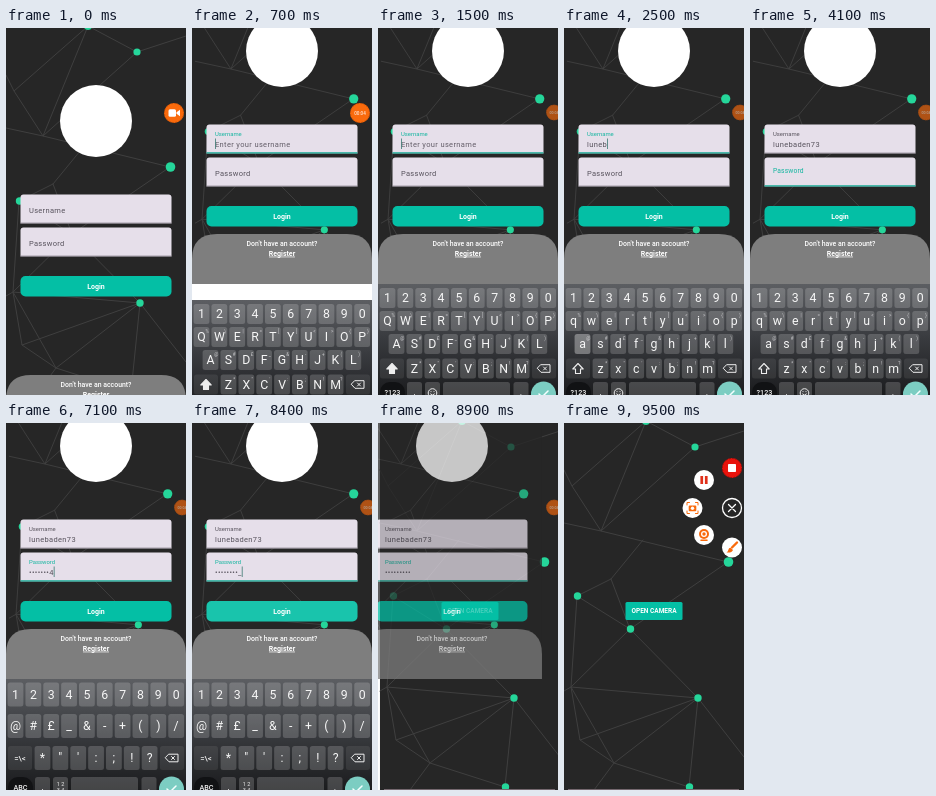
These frames come from a looping animation (180 by 367 pixels, 9900 ms). An HTML page:

```html
<!DOCTYPE html>
<html lang="en">
<head>
<meta charset="utf-8">
<title>Login screen</title>
<style>
html, body { margin: 0; width: 100%; height: 100%; overflow: hidden; background: #262626; }
svg { display: block; width: 100%; height: 100%; }
text { font-family: Roboto, "Noto Sans", sans-serif; white-space: pre; }
.mid { text-anchor: middle; }
</style>
</head>
<body>
<svg id="stage" viewBox="0 0 180 367">
  <defs>
    <clipPath id="pageClip"><rect id="pageBox" width="180" height="397"/></clipPath>
    <clipPath id="btnClip"><rect x="14.500" y="178" width="151" height="20.500" rx="5"/></clipPath>
    <linearGradient id="boardFill" gradientUnits="userSpaceOnUse" x1="0" y1="256" x2="0" y2="367">
      <stop stop-color="#5c5e62"/><stop offset=".5" stop-color="#383a3e"/><stop offset="1" stop-color="#1b1c1e"/>
    </linearGradient>
  </defs>
  <rect width="180" height="367" fill="#fff"/>
</svg>
<script>
const LOOP = 9900, STEP = 100;
const TEAL = '#04bfa5', INK = '#57525c', ORANGE = '#f96a0c';
const USER = 'lunebaden73', PASS = 'treewet4_';
const userTimes = [1700, 1900, 2000, 2200, 2400, 2600, 2700, 2900, 3000, 3200, 3350];
const passTimes = [5100, 5500, 5700, 5800, 6200, 6400, 6550, 6700, 7650];

const stage = document.getElementById('stage');
const pageBox = document.getElementById('pageBox');

function add(parent, tag, attrs = {}, content = '') {
  const el = document.createElementNS('http://www.w3.org/2000/svg', tag);
  set(el, attrs);
  if (content) el.textContent = content;
  parent.appendChild(el);
  return el;
}
function set(el, attrs) {
  for (const k in attrs) el.setAttribute(k, attrs[k]);
}
const group = (parent, attrs) => add(parent, 'g', attrs);
const box = (p, x, y, width, height, fill, rx = 0) => add(p, 'rect', { x, y, width, height, fill, rx });
const dot = (p, cx, cy, r, fill) => add(p, 'circle', { cx, cy, r, fill });
const line = (p, d, stroke, w = 1, fill = 'none') =>
  add(p, 'path', { d, stroke, fill, 'stroke-width': w, 'stroke-linecap': 'round', 'stroke-linejoin': 'round' });
const label = (p, x, y, size, fill, str, more = {}) =>
  add(p, 'text', { x, y, fill, 'font-size': size, ...more }, str);
const centred = (p, x, y, size, fill, str, weight = 400) =>
  label(p, x, y, size, fill, str, { class: 'mid', 'font-weight': weight });
const show = (el, on) => set(el, { visibility: on ? 'inherit' : 'hidden' });
const move = (el, x, y, s = 1) => set(el, { transform: `translate(${x} ${y}) scale(${s})` });

// Value at t from a list of [time, value], linear in between
function track(t, keys) {
  if (t <= keys[0][0]) return keys[0][1];
  for (let i = 1; i < keys.length; i++) {
    const [a, u] = keys[i - 1], [b, v] = keys[i];
    if (t <= b) return u + (v - u) * (t - a) / (b - a);
  }
  return keys[keys.length - 1][1];
}

function network(parent) {
  const g = group(parent);
  line(g, 'M82 -2L131 24L37 108L82 -2L8 63L37 108L164 139L66 206L134 275L50 340L7 264L66 206' +
    'L13 173L47 156L79 117M47 156L66 206M0 47L8 63M0 100L37 108M13 173L7 264L16 317L134 275' +
    'L125 364L50 340L30 367M134 275L180 334M0 268L7 264L134 275M16 317L50 340M131 24L180 8', '#3f3f3f', 1);
  [[82, -2, 4], [131, 24, 3.6], [164.500, 139, 4.8], [13.500, 173, 3.7], [66.500, 206, 3.7],
    [134, 275, 3.7], [125.500, 364, 3.7]].forEach(n => dot(g, ...n, '#25d69a'));
  return g;
}

// Camera page
const cam = group(stage);
box(cam, 0, 0, 180, 367, '#262626');
network(cam);
box(cam, 61.500, 179, 57, 18, TEAL, 1.500);
centred(cam, 90, 190.400, 6.500, '#fff', 'OPEN CAMERA', 700);
box(cam, 4, 366, 171, 1, '#75686f');

// Login page
const login = group(stage);
const page = group(login, { 'clip-path': 'url(#pageClip)' });
box(page, 0, 0, 180, 397, '#262626');
const net = network(page);
const form = group(page);
dot(form, 90, 23, 36, '#fff');

function field(y, name, hint) {
  const g = group(form, { transform: `translate(14.500 ${y})` });
  add(g, 'path', { d: 'M0 29V3Q0 0 3 0H148Q151 0 151 3V29Z', fill: '#e6dfea' });
  const rule = box(g, 0, 28.200, 151, .8, '#77717b');
  const title = label(g, 8.500, 18.600, 7.500, INK, name);
  const typed = label(g, 8.500, 22.300, 7.500, INK, '', { 'letter-spacing': .35 });
  const caret = box(g, 8.500, 14, .8, 10.500, '#3c7a73');
  return (focus, lift, str, caretOn) => {
    set(rule, focus ? { y: 27.800, height: 1.200, fill: '#08a891' } : { y: 28.200, height: .8, fill: '#77717b' });
    set(title, {
      y: 18.600 - 7.200 * lift, 'font-size': 7.500 - 1.600 * lift,
      'letter-spacing': .3 * (1 - lift), fill: focus ? '#12b59f' : INK
    });
    const empty = !str;
    typed.textContent = empty && focus && lift === 1 ? hint : str;
    set(typed, { fill: empty ? '#635d68' : INK });
    show(caret, caretOn);
    set(caret, { x: empty ? 8.500 : 8.500 + typed.getComputedTextLength() });
  };
}
const userField = field(96.500, 'Username', 'Enter your username');
const passField = field(129.500, 'Password', 'Enter your password');

box(form, 14.500, 178, 151, 20.500, TEAL, 5);
const ripple = add(group(form, { 'clip-path': 'url(#btnClip)' }), 'circle', { cx: 90, cy: 188, fill: '#fff' });
centred(form, 90, 190.700, 7, '#fff', 'Login', 700);

const card = group(page);
add(card, 'path', { d: 'M0 256V231Q0 206 25 206H155Q180 206 180 231V256Z', fill: '#7e7e7e' });
centred(card, 90, 217.600, 6.900, '#fff', "Don't have an account?", 500);
centred(card, 90, 227.600, 7, '#fff', 'Register', 700);
box(card, 77, 228.600, 26, .7, '#fff');

// Keyboard
const board = group(stage);
box(board, 0, 256, 180, 111, 'url(#boardFill)');
box(board, 0, 366, 180, 80, '#1b1c1e');
const KEY = 'rgba(255,255,255,.18)', DARK = 'rgba(255,255,255,.08)';

function keyRow(g, map, chars, x0, y, h, hints = '') {
  [...chars].forEach((c, i) => {
    const x = x0 + 17.850 * i;
    box(g, x - 7.900, y - h / 2, 15.800, h, KEY, 2.500);
    centred(g, x, y + 4.200, 12.300, '#f6f6f6', c);
    if (hints) centred(g, x + 5.800, y - 4, 4.600, '#c9c9cc', hints[i]);
    map[c] = [x, y, h];
  });
}
function eraseKey(g, y, h) {
  box(g, 154, y - h / 2, 24, h, DARK, 2.500);
  line(g, `M163 ${y - 3.800}H172V${y + 3.800}H163L159.500 ${y}ZM165.500 ${y - 1.500}l3 3m0 -3l-3 3`, '#eee', 1);
}
function bottomRow(g, y, name, digits) {
  box(g, 2, y - 10, 25, 22, '#111214', 10);
  centred(g, 14.500, y + 2.800, 7.200, '#f4f4f4', name, 500);
  [[29, 15], [47, 15], [65, 67], [135.500, 15]].forEach(([x, w]) => box(g, x, y - 10, w, 22, KEY, 2.500));
  centred(g, 36.500, y + 3, 9, '#eee', ',');
  centred(g, 143, y + 3, 9, '#eee', '.');
  if (digits) {
    centred(g, 54.500, y - 1, 5.500, '#eee', '1 2');
    centred(g, 54.500, y + 5, 5.500, '#eee', '3 4');
  } else {
    add(g, 'circle', { cx: 54.500, cy: y + 1, r: 4.300, fill: 'none', stroke: '#eee' });
    line(g, `M52.500 ${y + 2}q2 2.500 4 0M53 ${y - .5}v.2M56 ${y - .5}v.2`, '#eee', .9);
  }
  dot(g, 165.500, y + 2, 12.500, '#7ccdc2');
  line(g, `M161 ${y + 2}l3 3l6 -6`, '#f5ffff', 1.500);
}
function letters(upper) {
  const g = group(board), map = {}, cs = s => upper ? s.toUpperCase() : s;
  keyRow(g, map, '1234567890', 9.500, 270, 20);
  keyRow(g, map, cs('qwertyuiop'), 9.500, 293, 20, '%\\|=[]<>{}');
  keyRow(g, map, cs('asdfghjkl'), 18.500, 316, 20, '@#£_&-+()');
  keyRow(g, map, cs('zxcvbnm'), 36.500, 340.500, 20, '*"\':;!?');
  box(g, 2, 330.500, 24, 20, DARK, 2.500);
  line(g, 'M14 335.500L8.800 341H11.500V345.500H16.500V341H19.200Z', '#eee', 1.100, upper ? '#eee' : 'none');
  eraseKey(g, 340.500, 20);
  bottomRow(g, 364, '?123', false);
  return { g, map };
}
function symbols() {
  const g = group(board), map = {};
  keyRow(g, map, '1234567890', 9.500, 271.500, 24);
  keyRow(g, map, '@#£_&-+()/', 9.500, 303, 24);
  keyRow(g, map, '*"\':;!?', 36.500, 335, 24);
  box(g, 2, 323, 24, 24, DARK, 2.500);
  centred(g, 14, 337.500, 7.800, '#f4f4f4', '=\\<', 500);
  eraseKey(g, 335, 24);
  bottomRow(g, 364, 'ABC', true);
  return { g, map };
}
const caps = letters(true), lower = letters(false), signs = symbols();
const glow = box(board, 0, 0, 15.800, 20, 'rgba(255,255,255,.2)', 2.500);

// Floating recorder button and its menu
const bubble = group(stage);
dot(bubble, 0, 0, 10, ORANGE);
add(bubble, 'circle', { r: 9.500, fill: 'none', stroke: '#b94a05', 'stroke-dasharray': '1.500 1.500', 'stroke-width': .8 });
const video = group(bubble);
box(video, -5.500, -3.800, 7.500, 7.600, '#fff', 1.500);
add(video, 'path', { d: 'M2.500 -.7L6 -3.300V3.300L2.500 .7Z', fill: '#fff' });
const timer = centred(bubble, 0, 1.700, 4.600, '#ffe3d0', '00:04', 500);

const menu = group(stage);
const items = [[0, -40], [-28, -28], [-39.500, 0], [-28, 27], [0, 39.500]].map(([x, y], i) => {
  const g = group(menu);
  dot(g, 0, 0, 10, i ? '#fff' : '#e8130c');
  return { g, x, y };
});
const [rec, pause, shot, webcam, brush] = items.map(i => i.g);
add(rec, 'circle', { r: 9.600, fill: 'none', stroke: '#7d100c', 'stroke-dasharray': '1.500 1.500', 'stroke-width': .8 });
box(rec, -4, -4, 8, 8, '#fff', .8);
box(pause, -3.600, -4, 2.700, 8, '#e0301a');
box(pause, .9, -4, 2.700, 8, '#e0301a');
line(shot, 'M-5.500 -3V-5.500H-3M3 -5.500H5.500V-3M5.500 3V5.500H3M-3 5.500H-5.500V3', ORANGE, 1);
box(shot, -3.800, -2.600, 7.600, 5.800, ORANGE, 1);
dot(shot, 0, .3, 1.700, '#fff');
dot(webcam, 0, -1, 5, ORANGE);
dot(webcam, 0, -1, 3, '#fff');
dot(webcam, 0, -1, 1.700, ORANGE);
line(webcam, 'M-3 5.300H3', ORANGE, 1.500);
line(brush, 'M5 -5L0 0', ORANGE, 2.400);
add(brush, 'path', { d: 'M-1.500 .2L1 2.500Q0 5.500 -5.500 5Q-3.700 4 -3.600 2.200Q-3.300 .4 -1.500 .2Z', fill: ORANGE });
const close = group(menu, { transform: 'translate(168 85)' });
add(close, 'circle', { r: 9.500, fill: '#262626', stroke: '#fff', 'stroke-width': 1.300 });
line(close, 'M-3.500 -3.500L3.500 3.500M3.500 -3.500L-3.500 3.500', '#fff', 1.300);

const count = (t, times) => times.filter(x => x <= t).length;

// The newest character stays readable for a moment
function masked(t) {
  const n = count(t, passTimes);
  if (!n) return '';
  const clear = t - passTimes[n - 1] < 850;
  return clear ? '•'.repeat(n - 1) + PASS[n - 1] : '•'.repeat(n);
}
// A key lights up just before its character appears
function pressed(t) {
  const find = (times, str) => str[times.findIndex(x => t >= x - 100 && t < x + 50)];
  return find(userTimes, USER) || find(passTimes, PASS);
}

function draw(t) {
  const short = t >= 600;
  set(pageBox, { height: short ? 256 : 397 });
  set(net, { transform: short ? 'translate(3.300 -63) scale(.963)' : '' });
  move(form, 0, short ? 0 : 70);
  move(card, 0, short ? 0 : 141);

  const onPass = t >= 4100;
  userField(t >= 500 && !onPass, track(t, [[400, 0], [600, 1]]), USER.slice(0, count(t, userTimes)), t >= 600 && !onPass);
  passField(onPass, track(t, [[4000, 0], [4200, 1]]), masked(t), t >= 4400 && t < 8700);
  set(ripple, {
    r: track(t, [[8000, 0], [8400, 80]]),
    opacity: t < 8100 ? 0 : track(t, [[8200, .25], [8500, 0]])
  });

  // Page change: both pages slide by a tenth of the width
  const slide = 18 * track(t, [[8700, 0], [8800, .62], [8900, .89], [9000, 1]]);
  show(cam, t >= 8800);
  show(login, t < 9000);
  move(cam, 18 - slide, 0);
  move(login, -slide, 0);
  set(login, { opacity: track(t, [[8700, 1], [8900, .74]]) });

  // Keyboard
  show(board, t >= 600 && t < 8800);
  move(board, 0, t < 8000
    ? track(t, [[600, 60], [700, 16], [800, 4], [900, 0]])
    : track(t, [[8600, 0], [8700, 60]]));
  const layout = t < 1600 ? caps : t < 7100 ? lower : signs;
  [caps, lower, signs].forEach(l => show(l.g, l === layout));
  const at = layout.map[pressed(t)];
  show(glow, !!at);
  if (at) set(glow, { x: at[0] - 7.900, y: at[1] - at[2] / 2, height: at[2] });

  // Recorder
  const away = t < 5000 ? track(t, [[900, 0], [1200, 1]]) : track(t, [[9000, 1], [9200, 0]]);
  move(bubble, 168 + 8 * away, 85 - .5 * away, 1 - .22 * away);
  set(bubble, { opacity: 1 - .35 * away });
  show(bubble, t < 9400);
  show(video, t < 100);
  show(timer, t >= 100);
  const open = track(t, [[9200, 0], [9300, .4], [9400, .85], [9500, 1]]);
  show(menu, t >= 9300);
  show(close, t >= 9400);
  items.forEach(({ g, x, y }) => move(g, 168 + x * open, 85 + y * open));
}

const start = performance.now();
function tick() {
  const t = (performance.now() - start) % LOOP;
  draw(Math.floor(t / STEP) * STEP);
  requestAnimationFrame(tick);
}
tick();
</script>
</body>
</html>
```
